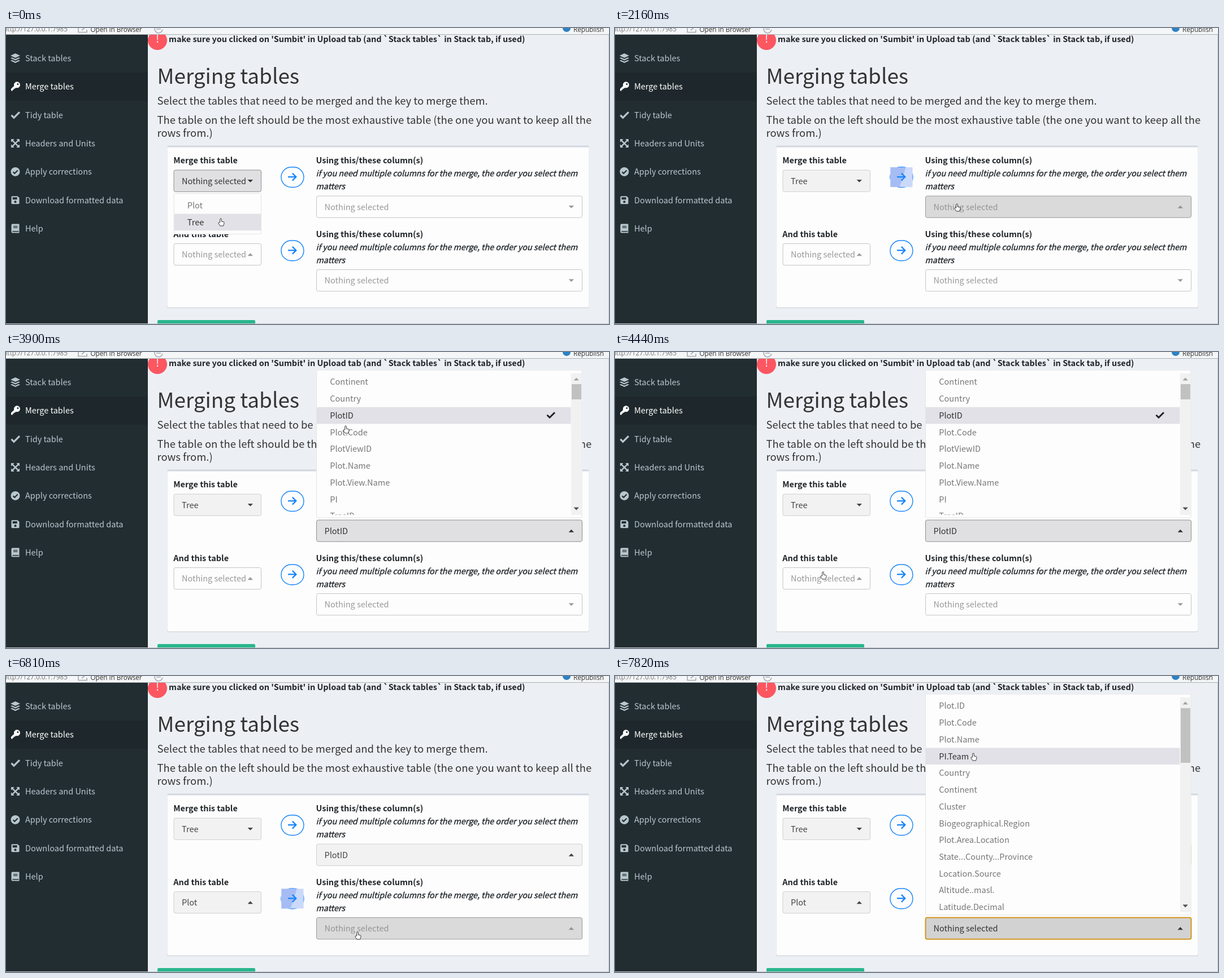
These frames come from a looping animation (1067 px wide and 525 px high, 8000 ms). An HTML page:

```html
<!DOCTYPE html>
<html lang="en">
<head>
<meta charset="utf-8">
<title>Merging tables</title>
<style>
  html, body { margin: 0; width: 100%; height: 100%; overflow: hidden; background: #ecf0f5; }
  svg { display: block; }
  text { font-family: "Noto Sans CJK SC", "Noto Sans CJK JP", "Noto Sans CJK", "Open Sans", sans-serif; font-size: 14.5px; fill: #333; }
  .label { font-weight: 700; font-size: 14.45px; fill: #212529; }
  .hint { font-style: italic; font-size: 14.3px; fill: #212529; stroke: #212529; stroke-width: .35px; }
  .lead { font-size: 18.46px; }
  .title { font-size: 36.9px; }
  .bar { font-family: "Open Sans", "Noto Sans", sans-serif; font-size: 11.7px; }
</style>
</head>
<body>
<svg id="stage" width="1067" height="525" viewBox="0 0 1067 525">
  <g id="page"></g>
  <g id="form"></g>
  <path id="hand" d="M-1.3 7V1.2Q-1.3 0 0 0T1.3 1.2V5L5 5.8Q6.3 6.2 6.1 7.6L5.4 10.5 4.6 13H-1L-4 8.6Q-4.6 7.2-3.2 7Z"
        fill="#fff" stroke="#333" stroke-width="1" stroke-linejoin="round"/>
</svg>
<script>
const LOOP = 8000, BLUE = '#1684fb';
const $ = id => document.getElementById(id);
const text = (x, y, s, attrs = '') => `<text x="${x}" y="${y}" ${attrs}>${s}</text>`;
const rect = (x, y, w, h, fill, attrs = '') =>
  `<rect x="${x}" y="${y}" width="${w}" height="${h}" fill="${fill}" ${attrs}/>`;
const path = (d, attrs) => `<path d="${d}" ${attrs}/>`;

// Sidebar icons, centred on the origin
const icons = {
  layers: c => path('M0-8.5 8.5-4.5 0-.5-8.5-4.5ZM-8.5 0-6-1.2 0 1.6 6-1.2 8.5 0 0 4ZM-8.5 4.5-6 3.3 0 6.1 6 3.3 8.5 4.5 0 8.5Z', `fill="${c}"`),
  key: c => path('M-7.5 7.5V4L0-3 3 0-1 4H-3V6H-5V8Z', `fill="${c}"`) +
    `<circle cx="3" cy="-3" r="5.5" fill="${c}"/><circle cx="4.4" cy="-4.4" r="1.5" fill="#1e282c"/>`,
  check: c => path('M-7 .5-2.5 5 7.5-5', `fill="none" stroke="${c}" stroke-width="3.2"`),
  expand: c => path('M-5-5 5 5M5-5-5 5', `stroke="${c}" stroke-width="2.4"`) +
    path('M-7.5-7.5H-1.8L-7.5-1.8ZM7.5-7.5V-1.8L1.8-7.5ZM-7.5 7.5V1.8L-1.8 7.5ZM7.5 7.5H1.8L7.5 1.8Z', `fill="${c}"`),
  checkCircle: c => `<circle r="8" fill="${c}"/>` +
    path('M-4 .3-1.2 3 4.2-2.5', 'fill="none" stroke="#222d32" stroke-width="2.2"'),
  save: c => path('M-7-5.5Q-7-7-5.5-7H4L7-4V5.5Q7 7 5.5 7H-5.5Q-7 7-7 5.5Z', `fill="${c}"`) +
    rect(-4.8, -5, 8, 4, '#222d32') + '<circle cy="3" r="2.1" fill="#222d32"/>',
  book: c => path('M-7-6Q-7-8-5-8H7V8H-5Q-7 8-7 6Z', `fill="${c}"`) +
    path('M-3.5-4H4M-3.5-1.5H4M-5 5.2H6', 'stroke="#222d32" stroke-width="1.4"')
};
const sidebar = [
  ['layers', 'Stack tables'], ['key', 'Merge tables'], ['check', 'Tidy table'],
  ['expand', 'Headers and Units'], ['checkCircle', 'Apply corrections'],
  ['save', 'Download formatted data'], ['book', 'Help']
];

function drawPage() {
  const items = sidebar.map(([icon, name], i) => {
    const y = 53.5 + i * 50.35, color = i === 1 ? '#fff' : '#b8c7ce';
    return `<g transform="translate(16.5 ${y})">${icons[icon](color)}</g>` +
      text(34, y + 5.4, name, `style="fill:${color}"`);
  }).join('');
  const block = (dy, label) => text(296.3, 240 + dy, label, 'class="label"') +
    text(548.6, 240 + dy, 'Using this/these column(s)', 'class="label"') +
    text(548.6, 263 + dy, 'if you need multiple columns for the merge, the order you select them', 'class="hint"') +
    text(548.6, 286 + dy, 'matters', 'class="hint"');
  $('page').innerHTML =
    rect(0, 0, 1067, 525, '#ecf0f5') + rect(0, 12, 251, 513, '#222d32') +
    rect(0, 79, 251, 50.5, '#1e282c') + items +
    '<circle cx="268" cy="22" r="17" fill="#fc5661"/>' +
    text(268, 26, '!', 'text-anchor="middle" style="fill:#fff;font-size:19px"') +
    text(288, 24.5, "make sure you clicked on 'Sumbit' in Upload tab (and `Stack tables` in Stack tab, if used)", 'class="label"') +
    rect(0, 0, 1067, 12, '#f4f6f8') + rect(0, 11, 1067, 1, '#aab0b5') +
    text(109, 6, 'http://127.0.0.1:7985', 'class="bar" text-anchor="end" style="fill:#777"') +
    path('M128-2V7.5H143V3M134 4 141-2', 'fill="none" stroke="#8b9299" stroke-width="1.2"') +
    text(149.5, 7, 'Open in Browser', 'class="bar"') +
    path('M277 3A7 7 0 1 1 274-4M266 2H274', 'fill="none" stroke="#a9afb5" stroke-width="1.6"') +
    '<circle cx="992" cy="0" r="7" fill="#2d82c4"/>' +
    text(1004, 7, 'Republish', 'class="bar"') +
    text(267.5, 98.5, 'Merging tables', 'class="title"') +
    text(267.5, 136.3, 'Select the tables that need to be merged and the key to merge them.', 'class="lead"') +
    text(267.5, 170, 'The table on the left should be the most exhaustive table (the one you want to keep all the', 'class="lead"') +
    text(267.5, 192.5, 'rows from.)', 'class="lead"') +
    rect(285, 209, 747, 288, '#d5d9df', 'rx="3"') +
    rect(285.5, 208.5, 746, 287, '#fdfdfd', 'rx="3"') +
    path('M285.5 211.5V210.5Q286 208.5 288 208.5H1029Q1031 208.5 1031.5 210.5V211.5Z', 'fill="#d2d6de"') +
    block(0, 'Merge this table') + block(130.5, 'And this table') +
    rect(268, 518, 173, 8, '#28b78d', 'rx="2"') +
    rect(0, 524, 1067, 1, '#c3c7cb') + rect(1066, 12, 1, 513, '#c9cdd1');
}

// fill, border, text colour, border width
const looks = {
  off: ['#fdfdfd', '#c4c4c4', '#999', 1],
  offHover: ['#dadada', '#999', '#949494', 1],
  on: ['#f2f2f2', '#cfcfcf', '#444', 1],
  active: ['#e0e0e3', '#8f8f92', '#333', 1],
  focus: ['#d2d2d2', '#d4961e', '#333', 2]
};

function button(x, y, w, value, look, up) {
  const [fill, stroke, color, line] = looks[look];
  const cx = x + w - 19.2, cy = y + 19.3, s = up ? -1 : 1;
  return rect(x, y, w, 38.3, fill, `rx="3" stroke="${stroke}" stroke-width="${line}"`) +
    text(x + 14, y + 24.8, value, `style="fill:${color}"`) +
    path(`M${cx - 4.7} ${cy - 2.4 * s}h9.4l-4.7 ${4.9 * s}Z`, `fill="${color}"`);
}

function menu(x, y, w, h, items, active, thumb, picked) {
  const rowWidth = thumb ? w - 20 : w - 1;
  const rows = items.map((name, i) => {
    const top = 29.72 * i, on = i === active;
    return (on ? rect(0, top, rowWidth, 29.72, '#e1e1e7') : '') +
      text(23.3, top + 20.2, name, `style="fill:${on ? '#333' : '#777'}"`) +
      (i === picked ? path(`M407.5 ${top + 14}l4.5 4.5 9-9`, 'fill="none" stroke="#222" stroke-width="3"') : '');
  }).join('');
  const sx = x + w - 19, bottom = y + h - 5;
  const bar = !thumb ? '' : rect(sx, y + 6, 18.5, h - 11, '#f1f1f1') +
    rect(sx + 1, y + 25, 17, thumb, '#c1c1c1') +
    path(`M${sx + 4.5} ${y + 18.5}h9.4l-4.7-5Z`, 'fill="#a3a3a3"') +
    path(`M${sx + 4.5} ${bottom - 13.5}h9.4l-4.7 5Z`, 'fill="#505050"');
  return rect(x, y, w, h, '#fdfdfd', 'rx="2" stroke="#e4e4e6"') +
    `<svg x="${x + .5}" y="${y + 6.3}" width="${w - 1}" height="${h - 11.5}" overflow="hidden">${rows}</svg>` + bar;
}

function arrow(y, selected) {
  const pill = rect(486.9, y - 17.9, 40, 35.8, '#fdfdfd', `rx="17.9" stroke="${BLUE}" stroke-width="1.4"`);
  const marked = selected ? rect(487, y - 17.5, 39.5, 35, '#cbd9fa') +
    path(`M487.5 ${y - 17.5}h27l-5 17-6 18h-16Z`, 'fill="#a5bcf4"') : '';
  return pill + marked +
    path(`M499 ${y - .5}h14M506.8 ${y - 7}l6.5 6.5-6.5 6.5`, `fill="none" stroke="${BLUE}" stroke-width="2.3"`);
}

const tables = ['Plot', 'Tree'];
const treeColumns = ['Continent', 'Country', 'PlotID', 'Plot.Code', 'PlotViewID', 'Plot.Name', 'Plot.View.Name', 'PI', 'TreeID'];
const plotColumns = ['Plot.ID', 'Plot.Code', 'Plot.Name', 'PI.Team', 'Country', 'Continent', 'Cluster', 'Biogeographical.Region',
  'Plot.Area.Location', 'State...County...Province', 'Location.Source', 'Altitude..masl.', 'Latitude.Decimal'];

// Pointer steps: time, x, y, highlighted menu row
const steps = [
  [0, 380, 338, 1], [390, 400, 325], [540, 443, 298], [700, 490, 272], [850, 516, 266],
  [1240, 518, 267], [1610, 522.5, 270], [1750, 542, 284], [1880, 572, 302], [2010, 596, 311],
  [2140, 605, 312], [2280, 606, 312], [2680, 607, 235, 6], [2830, 607, 168, 4], [2950, 606, 146, 3],
  [3090, 604, 118, 2], [3230, 603, 110, 2], [3520, 602, 109, 2], [3900, 601, 131, 2],
  [4050, 566, 205, 2], [4180, 490, 290, 2], [4310, 415, 358, 2], [4440, 368, 390, 2],
  [4560, 355, 395], [4940, 354, 376], [5080, 355, 348, 1], [5210, 356, 326, 0],
  [5580, 357, 328], [5880, 388, 342], [6020, 440, 368], [6150, 488, 387], [6280, 512, 393],
  [6660, 575, 428], [6810, 622, 454], [6930, 633, 453], [7050, 636, 451],
  [7570, 636, 335, 9], [7690, 635, 224, 6], [7820, 634, 137, 3]
];

function drawForm(t, row) {
  const during = (from, to) => t >= from && t < to;
  const pick = (...pairs) => pairs.filter(([from]) => t >= from).pop()[1];
  const none = 'Nothing selected';
  const firstLook = pick([0, 'active'], [1120, 'on']);
  const firstKey = pick([0, 'off'], [1880, 'offHover'], [2280, 'focus'], [3520, 'active'], [4560, 'on']);
  const secondLook = pick([0, 'off'], [4560, 'focus'], [5460, 'active'], [6280, 'on']);
  const secondKey = pick([0, 'off'], [6810, 'offHover'], [7170, 'focus']);
  $('form').innerHTML =
    button(297, 252, 154.5, t < 120 ? none : 'Tree', firstLook, false) +
    button(297, 382.5, 154.5, t < 5460 ? none : 'Plot', secondLook, true) +
    button(549.5, 298, 470, t < 3520 ? none : 'PlotID', firstKey, t >= 1120) +
    button(549.5, 428.5, 470, none, secondKey, t >= 6660) +
    arrow(264.6, during(850, 2280)) + arrow(394.9, during(6150, 7170)) +
    (t < 120 ? menu(297, 293.5, 154.5, 72, tables, row) : '') +
    (during(4560, 5460) ? menu(297, 307.5, 154.5, 72, tables, row) : '') +
    (during(2280, 4560) ? menu(549.5, 32, 469.5, 262, treeColumns, row, 27, t >= 3520 ? 2 : -1) : '') +
    (t >= 7170 ? menu(549.5, 32, 469.5, 392, plotColumns, row, 97) : '');
}

const changes = [...new Set([120, 1120, 5460, 7170, ...steps.map(s => s[0])])].sort((a, b) => a - b);
let shown = -1;

function render() {
  const now = performance.now() % LOOP;
  const t = changes.filter(c => c <= now).pop();
  if (t !== shown) {
    shown = t;
    const [, x, y, row = -1] = steps.filter(s => s[0] <= t).pop();
    drawForm(t, row);
    $('hand').setAttribute('transform', `translate(${x} ${y})`);
  }
  requestAnimationFrame(render);
}

drawPage();
render();
</script>
</body>
</html>
```
